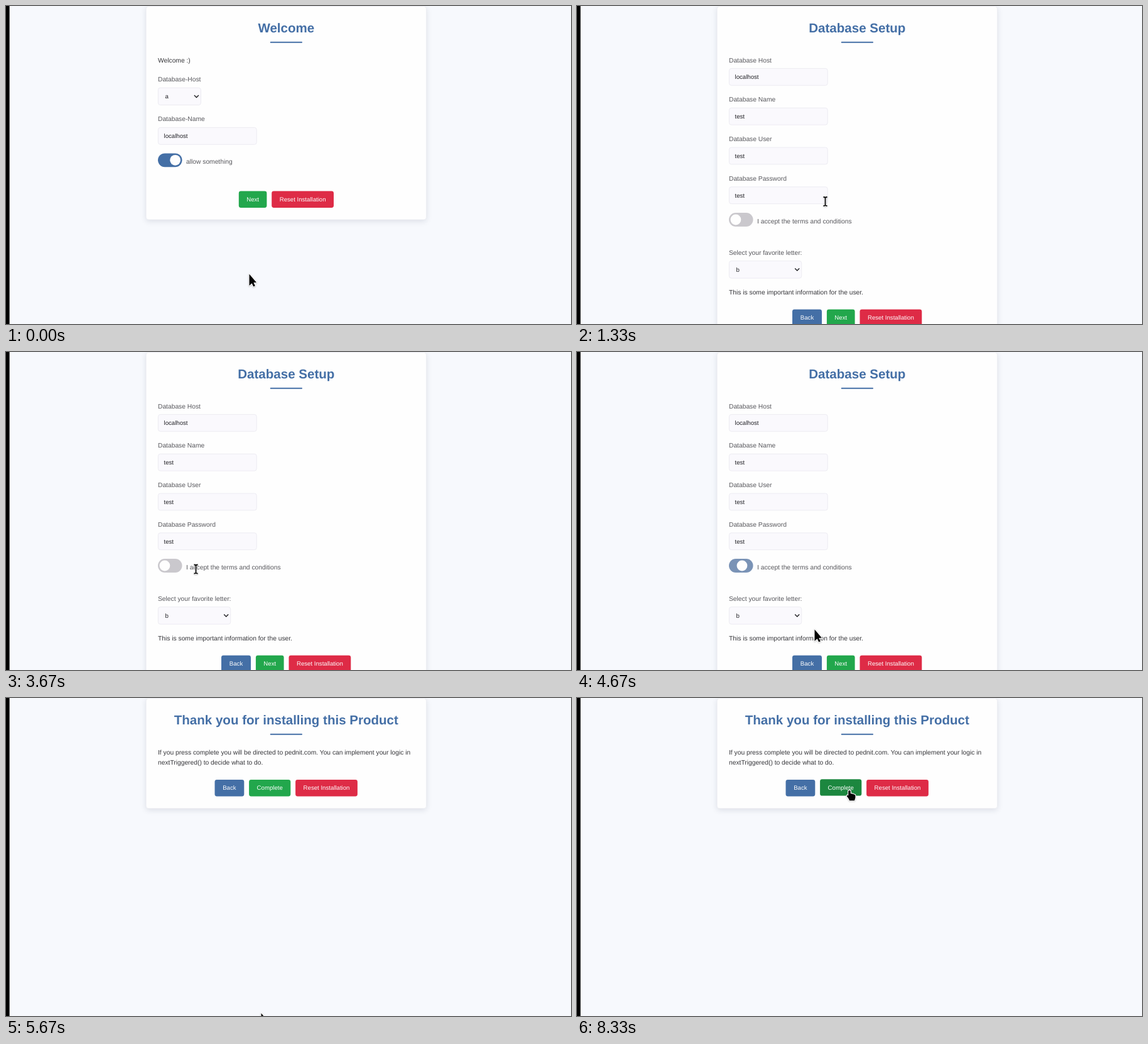
Animation, 900 px wide and 506 px high, one loop 10000 ms. Source, as an HTML page with a canvas:

```html
<!DOCTYPE html>
<html lang="en">
<head>
<meta charset="utf-8">
<title>Installation wizard</title>
<style>
  html, body { margin: 0; width: 100%; height: 100%; overflow: hidden; background: #f7f9fd; }
  canvas { display: block; width: 900px; height: 506px; }
</style>
</head>
<body>
<canvas id="stage" width="900" height="506"></canvas>
<script>
const ctx = document.getElementById('stage').getContext('2d');
ctx.textRendering = 'geometricPrecision';

const LOOP = 10000;
const FONT = '"Liberation Sans", Arial, sans-serif';
const BLUE = '#446fa6', RED = '#de2b46';
const GREEN = [34, 167, 76], DARK_GREEN = [28, 135, 63];
const GREY = [202, 200, 205], ON = [68, 111, 166];

// time, page, pointer, x, y, button hover 0..1, toggle 0..1
const steps = [
  [0, 'welcome', 'arrow', 387, 426, 0, 0],
  [330, 'welcome', 'arrow', 402, 360, 0, 0],
  [670, 'welcome', 'arrow', 395, 321, 0, 0],
  [1000, 'welcome', 'hand', 399, 308, 0.7, 0],
  [1330, 'setup', 'beam', 395.5, 311, 0, 0],
  [1670, 'setup', 'arrow', 397, 477, 0, 0],
  [2000, 'setup', 'hand', 420, 497, 1, 0],
  [2670, 'setup', 'hand', 433, 497, 1, 0],
  [3670, 'setup', 'beam', 302.5, 345.5, 0, 0],
  [4000, 'setup', 'hand', 247, 344, 0, 0],
  [4330, 'setup', 'hand', 250, 345, 0, 0],
  [4670, 'setup', 'arrow', 378, 441, 0, 0.6],
  [5000, 'setup', 'hand', 406, 503, 0.6, 1],
  [5330, 'setup', 'hand', 406, 500.5, 1, 1],
  [5670, 'done', 'arrow', 406, 501, 0, 0],
  [6000, 'done', 'arrow', 405, 500, 0, 0],
  [6330, 'done', 'arrow', 402, 320, 0, 0],
  [6670, 'done', 'arrow', 450, 126, 0, 0],
  [7000, 'done', 'hand', 431, 135, 0.66, 0],
  [7330, 'done', 'hand', 432, 141, 1, 0],
  [7670, 'done', 'hand', 440, 148, 1, 0],
  [8330, 'done', 'hand', 434, 146.5, 1, 0]
];

const mix = (a, b, p) => `rgb(${a.map((v, i) => Math.round(v + (b[i] - v) * p))})`;

function box(x, y, w, h, r, fill, stroke) {
  ctx.beginPath();
  ctx.roundRect(x, y, w, h, r);
  ctx.fillStyle = fill;
  ctx.fill();
  if (stroke) {
    ctx.strokeStyle = stroke;
    ctx.lineWidth = 0.8;
    ctx.stroke();
  }
}

// cy is the middle of the capital letters
function text(str, x, cy, size, color, align = 'left', weight = '') {
  ctx.font = `${weight} ${size}px ${FONT}`;
  ctx.textAlign = align;
  ctx.fillStyle = color;
  ctx.fillText(str, x, cy + size * 0.35);
}

const label = (str, cy, x = 242) => text(str, x, cy, 10.27, '#58585d');
const para = (str, cy) => text(str, 242, cy, 10.27, '#37373b');

function card(height, title) {
  ctx.save();
  ctx.shadowColor = 'rgba(30, 40, 70, 0.13)';
  ctx.shadowBlur = 10;
  ctx.shadowOffsetY = 2.5;
  box(223, 0.5, 446.6, height, 4, '#fefefe');
  ctx.restore();
  box(223, 0.5, 446.6, height, 4, '#fefefe', '#e9eaf0');
  text(title, 446.3, 35.2, 20.54, BLUE, 'center', 'bold');
  box(420.7, 56.7, 51.3, 2, 1, BLUE);
}

function input(str, y) {
  box(242.4, y + 0.4, 156.8, 26.9, 3.5, '#faf9fd', '#e9e8ef');
  text(str, 251.5, y + 13.8, 9.63, '#242428');
}

function select(str, y, w) {
  box(242.4, y + 0.4, w, 27.4, 3.5, '#faf9fd', '#e9e8ef');
  text(str, 253.6, y + 14.4, 9.63, '#242428');
  const x = 242.4 + w - 7;
  ctx.beginPath();
  ctx.moveTo(x - 3.5, y + 12.3);
  ctx.lineTo(x, y + 15.8);
  ctx.lineTo(x + 3.5, y + 12.3);
  ctx.strokeStyle = '#222226';
  ctx.lineWidth = 1.4;
  ctx.stroke();
}

function toggle(str, y, p) {
  box(242, y, 38.5, 21.8, 10.9, mix(GREY, ON, p));
  ctx.beginPath();
  ctx.arc(252.9 + 16.7 * p, y + 10.9, 8.4, 0, Math.PI * 2);
  ctx.fillStyle = '#fefefe';
  ctx.fill();
  label(str, y + 12.9, 287);
}

function button(str, x, y, w, fill, hover = 0) {
  const top = y - 0.8 * hover;
  box(x, top, w, 26.4, 3.4, fill);
  text(str, x + w / 2, top + 13.1, 9.63, '#fdfdfd', 'center');
}

const nextButton = (str, x, y, w, p) => button(str, x, y, w, mix(GREEN, DARK_GREEN, p), p);
const resetButton = (x, y) => button('Reset Installation', x, y, 98.8, RED);

const pages = {
  welcome(hover) {
    card(339.5, 'Welcome');
    para('Welcome :)', 86);
    label('Database-Host', 116.2);
    select('a', 129.7, 68);
    label('Database-Name', 179.7);
    input('localhost', 193);
    toggle('allow something', 234.4, 1);
    nextButton('Next', 370.8, 294.5, 44.6, hover);
    resetButton(423.2, 294.5);
  },
  setup(hover, on) {
    card(530, 'Database Setup');
    ['Host', 'Name', 'User', 'Password'].forEach((name, i) => {
      label('Database ' + name, 86 + 62.8 * i);
      input(i ? 'test' : 'localhost', 99 + 62.8 * i);
    });
    toggle('I accept the terms and conditions', 329.1, on);
    label('Select your favorite letter:', 392);
    select('b', 405.3, 115.3);
    para('This is some important information for the user.', 455.3);
    button('Back', 343, 482.8, 47, BLUE);
    nextButton('Next', 397.9, 482.8, 44.7, hover);
    resetButton(450.5, 482.8);
  },
  done(hover) {
    card(175.3, 'Thank you for installing this Product');
    para('If you press complete you will be directed to pednit.com. You can implement your logic in', 86);
    para('nextTriggered() to decide what to do.', 102.2);
    button('Back', 332.5, 130, 46.8, BLUE);
    nextButton('Complete', 387.1, 130, 66.2, hover);
    resetButton(461.1, 130);
  }
};

const pointers = {
  arrow: new Path2D('M.5 .5V19L4.6 15.2 7.2 20.6 9.9 19.3 7.4 14H12Z'),
  hand: new Path2D('M-1.8 2Q-1.8 .4 0 .4T1.8 2V5.8Q3.3 5 4.5 6.3 6 5.6 7 7 9.4 6.8 9.4 9' +
    'V12.2L8 16.8H0L-1 14.2 -4.2 9.8Q-4.6 8 -3 8L-1.8 9Z'),
  beam: new Path2D('M-3 -7Q-.8 -7 0 -6 .8 -7 3 -7M0 -6V6M-3 7Q-.8 7 0 6 .8 7 3 7')
};

function pointer(kind, x, y) {
  const path = pointers[kind], beam = kind === 'beam';
  ctx.save();
  ctx.translate(x, y);
  ctx.lineJoin = 'round';
  ctx.shadowColor = 'rgba(0, 0, 0, 0.25)';
  ctx.shadowBlur = 2;
  ctx.shadowOffsetY = 0.7;
  ctx.strokeStyle = '#fff';
  ctx.lineWidth = beam ? 3.6 : 2.2;
  ctx.stroke(path);
  ctx.shadowColor = 'transparent';
  if (beam) {
    ctx.strokeStyle = '#080808';
    ctx.lineWidth = 1.8;
    ctx.stroke(path);
  } else {
    ctx.fillStyle = '#050505';
    ctx.fill(path);
  }
  ctx.restore();
}

function draw(t) {
  const [, page, kind, x, y, hover, on] = steps.findLast(s => s[0] <= t);
  ctx.fillStyle = '#f7f9fd';
  ctx.fillRect(0, 0, 900, 506);
  ctx.fillStyle = '#000';
  ctx.fillRect(0, 0, 5.6, 506);
  pages[page](hover, on);
  pointer(kind, x, y);
}

const start = performance.now();
function tick() {
  draw((performance.now() - start) % LOOP);
  requestAnimationFrame(tick);
}
tick();
</script>
</body>
</html>
```
